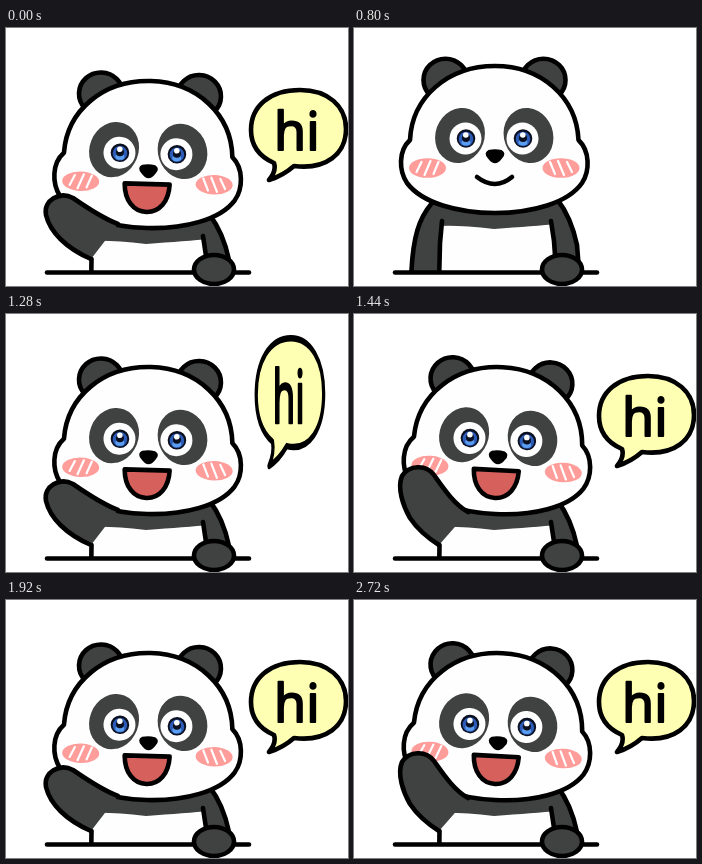
An HTML page for the animation above (2.88 s loop, 342 by 258 pixels).

```html
<!DOCTYPE html>
<html lang="en">
<head>
<meta charset="utf-8">
<title>Waving panda</title>
<style>
  html, body { margin: 0; width: 100%; height: 100%; overflow: hidden; background: #fff; }
  svg { display: block; width: 342px; height: 258px; }
  .ink { stroke: #000; stroke-width: 4.6; stroke-linecap: round; stroke-linejoin: round; }
  .fur { fill: #404141; }
  .skin { fill: #fefefe; }
  .open { fill: none; }
  text { font: 400 52px "Noto Sans", "Open Sans", sans-serif; stroke: #000; stroke-width: 1.8; stroke-linejoin: round; }
</style>
</head>
<body>
<svg viewBox="0 0 342 258">
  <defs>
    <clipPath id="desk"><rect width="342" height="244"/></clipPath>
    <g id="eye">
      <circle r="16" class="skin"/>
      <circle cx=".5" r="9.3" fill="#0b1020"/>
      <circle cx=".5" cy=".5" r="7.3" fill="#2c5cb8"/>
      <ellipse cx=".5" cy="4" rx="4.500" ry="3" fill="#5b9df0"/>
      <circle cx=".5" cy="-.5" r="4" fill="#0b1020"/>
      <circle cx=".3" cy="-3.500" r="2.800" fill="#fff"/>
    </g>
    <g id="cheek">
      <ellipse rx="18.500" ry="9.800" fill="#ff9d9b"/>
      <path d="M-6-6L-11 4M3-7L-3 7M11-6L6 6" stroke="#fff" stroke-width="2.200" stroke-linecap="round"/>
    </g>
  </defs>

  <g clip-path="url(#desk)">
    <g id="panda">
      <path class="skin" d="M86 200H200V270H86Z"/>
      <path class="fur" d="M86 185H204V211Q180 213 140 216Q105 212 86 213Z"/>
      <path class="ink fur" d="M203 186C213 199 219 213 223 232L226 270H203L200 228L197 208"/>
      <path class="ink open" id="side" d="M85.500 231L85 270"/>
      <path class="ink fur" id="restArm" d="M90 186L78 190C66 204 58 222 57 270H85L86 230L88 208"/>
      <g id="head">
        <ellipse class="ink fur" cx="91.500" cy="67" rx="22" ry="21.300"/>
        <ellipse class="ink fur" cx="189.500" cy="67" rx="22" ry="21.300"/>
        <path class="ink skin" d="M56 127C58 84 94 53 141 53C187 53 222.500 84 224.500 127C236 138 236 158 228 170C214 190 178 200 141 200C104 200 68 190 53 170C45 158 44 138 56 127Z"/>
        <ellipse class="fur" rx="24.500" ry="28" transform="translate(106 122.500) rotate(20)"/>
        <ellipse class="fur" rx="24.500" ry="28" transform="translate(174.500 122.500) rotate(-20)"/>
        <use href="#eye" x="111.500" y="125.500"/>
        <use href="#eye" x="168.500" y="125.500"/>
        <use href="#cheek" x="73.500" y="155"/>
        <use href="#cheek" transform="translate(207 155) scale(-1 1)"/>
        <path d="M134.500 137Q141 135.500 147.500 137Q153 140 148 145.500Q141 155 134 145.500Q129 140 134.500 137Z"/>
        <path class="ink open" id="smile" d="M123 164Q141 178 158 164"/>
        <path class="ink" id="laugh" fill="#d6605c" d="M117.500 156H162.500C162 173 153 184 140 184C127 184 118 173 117.500 156Z"/>
      </g>
      <path class="ink fur" id="waveArm"/>
    </g>
  </g>

  <path class="ink open" d="M41 244.500H243"/>
  <ellipse class="ink fur" id="paw" cx="208" cy="241.500" rx="20" ry="14.500"/>

  <g id="bubble">
    <path class="ink" fill="#ffffb3" d="M268 135C252 128 245 116 245 102C245 78 264 62 294 62C322 62 340 78 340 101C340 126 320 142 288 138C280 145 273 149 263 152C268 146 270 141 268 135Z"/>
    <text x="268" y="121.500">hi</text>
  </g>
</svg>
<script>
const STEP = 160, STEPS = 18;
const $ = id => document.getElementById(id);
const show = (id, on) => $(id).style.display = on ? "" : "none";
const move = (id, transform) => $(id).setAttribute("transform", transform);

// An arm's fill closes along the edge of the belly.
const LOW = { tilt: 0, arm: "M84 193C72 189 60 181 46 181C32 182 27 194 33 204C42 222 64 230 86 235" };
const MID = { tilt: 1.5, arm: "M112 196C96 190 80 179 67 170C54 163 37 172 40 187C44 204 60 220 85 231" };
const HIGH = { tilt: 3, arm: "M114 198C100 190 90 175 80 161C72 150 55 151 48 162C43 174 49 192 56 204C64 216 74 224 85 231" };
const WAVE = [LOW, MID, HIGH, MID];
const RISE = [154, 41, -15, 0];                // drop of the body while popping up
const POP = [[.47, .565], [.71, 1.42]];        // bubble stretch while opening

function draw(step) {
  const waving = step === 0 || step >= 7;
  const beat = (step || STEPS) - 7;

  show("paw", step !== 1);
  show("panda", waving || step > 2);
  for (const id of ["smile", "restArm"]) show(id, !waving);
  for (const id of ["bubble", "laugh", "side", "waveArm"]) show(id, waving);

  if (waving) {
    const { tilt, arm } = WAVE[beat % 4];
    const [sx, sy] = POP[beat] || [1, 1];
    $("waveArm").setAttribute("d", arm);
    move("head", `rotate(${tilt} 141 200)`);
    move("panda", "");
    move("bubble", `translate(263 152) scale(${sx} ${sy}) translate(-263 -152)`);
  } else {
    move("head", "");
    move("panda", `translate(0 ${RISE[step - 3] || 0})`);
  }
}

function tick() {
  draw(Math.floor(performance.now() / STEP) % STEPS);
  requestAnimationFrame(tick);
}
tick();
</script>
</body>
</html>
```
